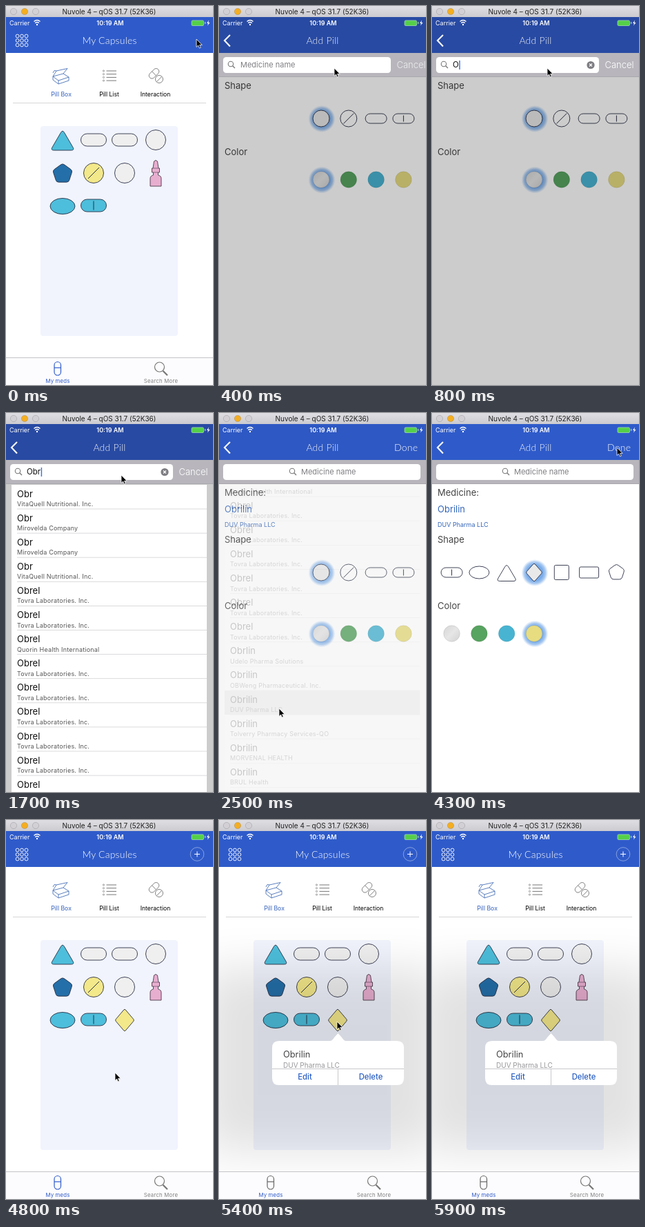
An HTML page that plays this animation: 300x549 px, repeating every 6000 ms.

```html
<!DOCTYPE html>
<html lang="en">
<head>
<meta charset="utf-8">
<title>Pill box</title>
<style>
html, body { margin: 0; width: 100%; height: 100%; overflow: hidden; background: #fff; }
svg { display: block; width: 300px; height: 549px; }
text { font-family: Inter, Roboto, sans-serif; white-space: pre; }
.nav { font-family: Lato, "Open Sans", sans-serif; font-weight: 300; letter-spacing: .2px; }
</style>
</head>
<body>
<svg id="stage" viewBox="0 0 300 549"></svg>
<script>
const LOOP = 6000, STEP = 100;
const BLUE = '#2f5bca', DIMBLUE = [40, 74, 163], LINE = '#2b2f45', TEAL = '#4dbedb', YELLOW = '#f3e88a', PALE = '#efefef';
const DRUG = 'Obrilin', MAKER = 'DUV Pharma LLC', QUERY = 'Obr';
const PITCH = 39.8, ROW = 35.1;

// ---- markup helpers ----
const text = (x, y, s, size, fill = '#222', more = '') =>
  `<text x="${x}" y="${y}" font-size="${size}" fill="${fill}" ${more}>${s}</text>`;
const mid = 'text-anchor="middle"';
const rect = (x, y, w, h, fill, more = '') =>
  `<rect x="${x}" y="${y}" width="${w}" height="${h}" fill="${fill}" ${more}/>`;
const circle = (x, y, r, fill, more = '') =>
  `<circle cx="${x}" cy="${y}" r="${r}" fill="${fill}" ${more}/>`;
const path = (d, stroke, width = 1, fill = 'none', more = '') =>
  `<path d="${d}" stroke="${stroke}" stroke-width="${width}" fill="${fill}" ${more}/>`;
const group = (id, body, more = '') => `<g id="${id}" ${more}>${body}</g>`;
const at = (x, y, body) => `<g transform="translate(${x} ${y})">${body}</g>`;
const edge = `stroke="${LINE}" stroke-width=".9"`;

// Closed polygon with softened corners
function soft(pts, r) {
  const n = pts.length;
  const toward = (a, b) => {
    const k = r / Math.hypot(b[0] - a[0], b[1] - a[1]);
    return `${(a[0] + (b[0] - a[0]) * k).toFixed(2)} ${(a[1] + (b[1] - a[1]) * k).toFixed(2)}`;
  };
  return pts.map((p, i) =>
    `${i ? 'L' : 'M'}${toward(p, pts[(i + n - 1) % n])}Q${p[0]} ${p[1]} ${toward(p, pts[(i + 1) % n])}`).join('') + 'Z';
}
const poly = (pts, r, fill) => path(soft(pts, r), LINE, .9, fill);
const pill = (w, h, fill) => rect(-w / 2, -h / 2, w, h, fill, `rx="${h / 2}" ${edge}`);
const round = (r, fill) => circle(0, 0, r, fill, edge);
const oval = (rx, ry, fill) => `<ellipse rx="${rx}" ry="${ry}" fill="${fill}" ${edge}/>`;
const triangle = (w, h, fill) => poly([[0, -h], [w, h], [-w, h]], 5, fill);
const diamond = (w, h, fill) => poly([[0, -h], [w, 0], [0, h], [-w, 0]], 2, fill);
const pentagon = (r, fill) => poly([0, 1, 2, 3, 4].map(i => {
  const a = (i * 72 - 90) * Math.PI / 180;
  return [r * Math.cos(a), r * Math.sin(a)];
}), 3, fill);
const slash = r => path(`M${-r} ${r}L${r} ${-r}`, LINE);
const bar = h => path(`M0 ${-h}V${h}`, LINE);

// ---- home page ----
const bottle = path('M-2.5 -18Q0 -21 2.5 -18L4 -8H5.5V-2H3.5V2Q8 3 8 7V18H-8V7Q-8 3 -3.5 2V-2H-5.5V-8H-4Z', '#4a3b4a', .9, '#e8aed0')
  + path('M-4 -8H4M-3.5 -2H3.5', '#4a3b4a', .6);
const shelf = [
  [82, 194, triangle(17.5, 15, TEAL)], [127, 194, pill(37, 18, PALE)],
  [172, 194, pill(37, 18, PALE)], [217, 194, round(14.5, PALE)],
  [82, 243, pentagon(15, '#246fa9')], [127, 242, round(14.5, YELLOW) + slash(8)],
  [172, 242, round(14.5, PALE)], [217, 243, bottle],
  [82, 290, oval(18, 11.5, TEAL)], [127, 289, pill(37, 18, TEAL) + bar(6.5)]
].map(p => at(...p)).join('');

const boxIcon = path('M68 102L83 98L91 103L76 108ZM68 102V107L76 113L91 108V103M76 108V113M68 102L73 94L89 90.500L83 98M73 94L70 93.500L68 97', '#4a72b8', .9, 'none', 'stroke-linejoin="round"');
const listIcon = [94, 98.7, 103.4, 108.1].map(y => circle(141.5, y, 1.1, 'none', 'stroke="#777" stroke-width=".7"')
  + path(`M145.500 ${y}H160`, '#777', 1)).join('');
const mixIcon = `<g transform="rotate(-45 214 98)">${rect(206, 94, 17, 8.5, 'none', 'rx="4.2" stroke="#777" stroke-width=".9"')}${path('M214.500 94V102.500', '#777', .9)}</g>`
  + circle(222, 106, 5.5, '#fff', 'stroke="#777" stroke-width=".9"') + path('M218.500 109.500L225.500 102.500', '#777', .9);

const home = rect(0, 68, 300, 481, '#fff') + boxIcon + listIcon + mixIcon
  + text(80, 131, 'Pill Box', 8.7, '#3562bd', mid) + text(149.5, 131, 'Pill List', 8.7, '#000', mid)
  + text(216.5, 131, 'Interaction', 8.7, '#000', mid)
  + rect(10, 140, 280, 1, '#d6d6d9') + rect(50, 174, 199, 304, '#f1f4fd', 'rx="4"')
  + shelf + group('added', diamond(14, 16.5, YELLOW), 'transform="translate(172 290)"')
  + group('shade', rect(-25, 215, 350, 265, '#000', 'opacity=".115" filter="url(#blur)"'), 'clip-path="url(#body)"')
  + rect(0, 509, 300, 40, '#fcfcfe') + rect(0, 509, 300, 1, '#c4c4c8')
  + group('medIcon', rect(70, 515.5, 9.5, 19.5, 'none', 'rx="4.7"') + '<path d="M70 524H79.500"/>', 'stroke-width="1.2"')
  + text(75, 546, 'My meds', 7.8, BLUE, mid + ' letter-spacing=".15"')
  + circle(222.5, 523, 7, 'none', 'stroke="#777" stroke-width="1.2"') + path('M227.500 528.500L234 535', '#777', 2.2)
  + text(224.5, 546, 'Search More', 7.8, '#808080', mid + ' letter-spacing=".2"');

// ---- add page ----
const choices = [
  round(12, 'inherit'), round(12, 'inherit') + slash(7.5), pill(31, 14, 'inherit'), pill(31, 14, 'inherit') + bar(4.5),
  oval(14.5, 9, 'inherit'), triangle(14.8, 12.5, 'inherit'), diamond(12, 13.5, 'inherit'),
  rect(-10.5, -10.5, 21, 21, 'inherit', `rx="2" ${edge}`), rect(-14, -8, 28, 16, 'inherit', `rx="2" ${edge}`), pentagon(12.3, 'inherit')
].map((s, i) => `<g class="choice" transform="translate(${i * PITCH} 0)">${s}</g>`).join('');
const colors = ['url(#pearl)', '#57a360', '#48b4d2', '#e7dc80']
  .map((c, i) => circle(i * PITCH, 0, 11.8, c, 'stroke="#0002" stroke-width=".7"')).join('');
const halo = y => circle(149, y, 19.5, 'url(#halo)');

const add = rect(0, 68, 300, 481, '#fff')
  + group('info', text(8, 120, 'Medicine:', 13, '#444') + text(8, 144, DRUG, 13, '#3566b8') + text(8, 165, MAKER, 9, '#3566b8'))
  + group('form', text(8, 120, 'Shape', 13, '#444') + text(8, 216, 'Color', 13, '#444')
    + halo(163.5) + halo(252) + `<g clip-path="url(#strip)">${group('shapes', choices)}${group('colors', colors)}</g>`)
  + group('dim', rect(0, 103, 300, 446, '#000', 'opacity=".2"'));

const searchBar = rect(0, 68, 300, 35, '#b8b6bc') + rect(0, 102, 300, 1, '#a9a8ae')
  + rect(6, 74, 286, 23, '#fff', 'id="field" rx="4.5"')
  + group('lens', circle(-1, -1, 3.7, 'none', 'stroke="#777" stroke-width="1.1"') + path('M1.800 1.800L5 5', '#777', 1.3))
  + text(0, 89, 'Medicine name', 11, '#7f7f84', 'id="hint"')
  + text(30, 89, '', 11.5, '#111', 'id="typed"') + rect(49, 79, 1.5, 13, '#3f73e6', 'id="caret"')
  + group('clear', circle(230, 85.5, 5.6, '#7d7d82') + path('M228 83.500L232 87.500M232 83.500L228 87.500', '#fff', 1.2))
  + text(0, 89.5, 'Cancel', 13, '#fff', 'id="cancel" font-weight="300"');

// ---- result list ----
const lab = 'Tovra Laboratories. Inc.', nutri = 'VitaQuell Nutritional. Inc.', firm = 'Mirovelda Company';
const results = [
  [QUERY, nutri], [QUERY, firm], [QUERY, firm], [QUERY, nutri], ['Obrel', lab], ['Obrel', lab],
  ['Obrel', 'Quorin Health International'], ...Array(6).fill(['Obrel', lab]),
  ['Obrlin', 'Udelo Pharma Solutions'], [DRUG, 'OBWeng Pharmaceutical. Inc.'], [DRUG, MAKER],
  [DRUG, 'Tolverry Pharmacy Services-QO'], [DRUG, 'MORVENAL HEALTH'], [DRUG, 'BRUL Health'], [DRUG, lab]
];
const rows = results.map(([name, maker], i) => at(0, 104 + i * ROW,
  (i === 15 ? rect(8, 0, 283, ROW, '#d4d4d4', 'id="hit"') : '')
  + text(16, 17.5, name, 13, '#111') + text(16, 31, maker, 9, '#555', 'letter-spacing=".2"')
  + rect(16, 34.6, 275, .8, '#d2d2d5'))).join('');
const list = rect(8, 104, 283, 445, '#fff') + `<g clip-path="url(#listBox)">${group('rows', rows)}</g>`;

// ---- header and window frame ----
const dots = [43.5, 50, 56.5].map(y => [16.5, 23, 29.5]
  .map(x => circle(x, y, 2.4, 'none', 'stroke="#fff" stroke-width=".9"')).join('')).join('');
const homeNav = dots + text(150, 55, 'My Capsules', 14, '#fff', mid + ' class="nav"')
  + group('plus', circle(277, 49.5, 9.8, 'none', 'stroke="#fff" stroke-width=".7" stroke-opacity=".6"') + path('M273 49.500H281M277 45.500V53.500', '#fff', 1));
const addNav = path('M16 42L8 50L16 58.500', '#fff', 2.1) + text(150, 55, 'Add Pill', 14, '#fff', mid + ' class="nav" opacity=".9"')
  + text(254, 55, 'Done', 14, '#fff', 'id="done" class="nav"');
const frame = rect(0, 0, 300, 16, 'url(#chrome)')
  + [['#d2d0d4', 11], ['#f4ae22', 27], ['#d2d0d4', 43]].map(([c, x]) => circle(x, 8, 4.6, c, 'stroke="#0003" stroke-width=".7"')).join('')
  + text(149.5, 12, 'Nuvole 4 – qOS 31.7 (52K36)', 10, '#222', mid)
  + text(5, 28, 'Carrier', 9, '#fff')
  + path('M40.500 22.500Q45 18.500 49.500 22.500M42.200 24.700Q45 22.200 47.800 24.700', '#fff', 1.3) + circle(45, 27, 1.2, '#fff')
  + text(151, 28, '10:19 AM', 9, '#fff', mid + ' font-weight="600"')
  + rect(269, 21, 17.5, 7.5, '#55d049', 'rx="1.5" stroke="#9fd8b0" stroke-width=".8"') + rect(288, 23, 1.2, 3, '#9fd8b0')
  + path('M294 20.500L291 25H293L292 28.500L295.500 24H293.300Z', 'none', 0, '#fff');

// ---- popover ----
const popup = path('M87 320H161Q164 320 167 315L172.500 309L178 315Q181 320 184 320H258Q268 320 268 330V374Q268 384 258 384H87Q77 384 77 374V330Q77 320 87 320Z', 'none', 0, '#fff')
  + text(93, 343.5, DRUG, 12.8, '#444') + text(93, 359, MAKER, 10, '#98989c')
  + rect(77, 360, 191, 1, '#c8c8cc') + rect(172, 360, 1, 24, '#c8c8cc')
  + text(124.5, 376, 'Edit', 11.3, '#2a5fc4', mid + ' font-weight="500"') + text(220, 376, 'Delete', 11.3, '#2a5fc4', mid + ' font-weight="500"');

const arrow = path('M0 0V11.500L2.600 9L4.400 13L6.300 12.200L4.600 8.400H8.200Z', '#fff', .8, '#000');

document.getElementById('stage').innerHTML = `<defs>
  <linearGradient id="chrome" x2="0" y2="1"><stop stop-color="#dfdee2"/><stop offset="1" stop-color="#cccbd0"/></linearGradient>
  <linearGradient id="pearl" y2="1"><stop stop-color="#d6d6d6"/><stop offset=".5" stop-color="#e6e6e6"/><stop offset="1" stop-color="#d2d2d2"/></linearGradient>
  <radialGradient id="halo"><stop offset=".6" stop-color="#79ace9"/><stop offset=".8" stop-color="#8db8ec" stop-opacity=".75"/><stop offset="1" stop-color="#a8c9f0" stop-opacity="0"/></radialGradient>
  <filter id="blur" x="-50%" y="-50%" width="200%" height="200%"><feGaussianBlur stdDeviation="34"/></filter>
  <clipPath id="body">${rect(0, 68, 300, 441, '#000')}</clipPath>
  <clipPath id="strip">${rect(12, 103, 279, 300, '#000')}</clipPath>
  <clipPath id="listBox">${rect(8, 104, 283, 445, '#000')}</clipPath>
</defs>` + group('home', home) + group('add', add + group('search', searchBar) + group('list', list))
  + rect(0, 16, 300, 52, BLUE, 'id="header"') + group('homeNav', homeNav) + group('addNav', addNav)
  + frame + group('popup', popup) + group('cursor', arrow);

// ---- motion ----
const el = {};
document.querySelectorAll('[id]').forEach(n => el[n.id] = n);
const choiceNodes = document.querySelectorAll('.choice');
const mix = (a, b, p) => a + (b - a) * p;

// Value at t along [time, value] stops
function along(t, stops) {
  if (t <= stops[0][0]) return stops[0][1];
  for (let i = 1; i < stops.length; i++) {
    const [t0, a] = stops[i - 1], [t1, b] = stops[i];
    if (t < t1) return mix(a, b, (t - t0) / (t1 - t0));
  }
  return stops[stops.length - 1][1];
}
const tracks = {
  push: [[0, 0], [100, .6], [200, 1], [4400, 1], [4500, .45], [4600, 0]],
  search: [[300, 0], [400, .86], [500, 1], [2300, 1], [2400, .3], [2500, 0]],
  dim: [[300, 0], [400, 1], [2300, 1], [2500, .18], [2600, 0]],
  list: [[900, 0], [1000, 1], [2300, 1], [2400, .6], [2500, .2], [2600, 0]],
  scroll: [[1700, 0], [1800, 25], [1900, 85], [2000, 160], [2100, 210], [2200, 228.5]],
  shapes: [[2800, 0], [2900, -25], [3000, -75], [3100, -115], [3200, -165], [3300, -213], [3400, -234.8], [3500, -6 * PITCH]],
  colors: [[3600, 0], [3700, -18], [3900, -85], [4000, -112], [4100, -3 * PITCH]],
  pop: [[5200, 0], [5300, .5], [5400, 1]]
};
const cursorStops = [
  [0, 276, 48], [100, 276, 48], [300, 167, 90], [1700, 167, 90], [1900, 150, 190], [2300, 87, 428], [2500, 87, 428],
  [2800, 215, 235], [3000, 150, 230], [3200, 190, 228], [3400, 128, 226], [3600, 215, 318], [3900, 135, 325],
  [4100, 140, 335], [4300, 268, 50], [4500, 268, 50], [4800, 158, 366], [4900, 158, 366], [5100, 171, 292],
  [5400, 171, 292], [5700, 310, 270]
];
const cursorX = cursorStops.map(s => [s[0], s[1]]), cursorY = cursorStops.map(s => [s[0], s[2]]);

const move = (node, x, y) => node.setAttribute('transform', `translate(${x} ${y})`);
const fade = (node, v) => node.setAttribute('opacity', v);
const set = (node, name, v) => node.setAttribute(name, v);

function draw(t) {
  const v = {};
  for (const k in tracks) v[k] = along(t, tracks[k]);
  const chosen = t >= 2400;

  move(el.home, -90 * v.push, 0);
  move(el.add, 300 * (1 - v.push), 0);
  fade(el.homeNav, 1 - v.push);
  fade(el.addNav, v.push);
  fade(el.plus, t < 100 ? 0 : 1);
  fade(el.done, chosen ? 1 : 0);
  fade(el.added, t >= 4500 ? 1 : 0);

  set(el.header, 'fill', `rgb(${[47, 91, 202].map((c, i) => Math.round(mix(c, DIMBLUE[i], v.dim)))})`);
  fade(el.dim, v.dim);

  const slide = Math.min(1, v.search * 1.17);
  const typed = t < 2400 ? QUERY.slice(0, t < 800 ? 0 : t < 1000 ? 1 : t < 1200 ? 2 : 3) : '';
  set(el.field, 'width', mix(286, 236, v.search));
  move(el.lens, mix(107, 18, slide), 85);
  set(el.hint, 'x', mix(119, 31, slide));
  fade(el.hint, typed ? 0 : 1);
  el.typed.textContent = typed;
  set(el.caret, 'x', typed ? 30.5 + el.typed.getComputedTextLength() : 30);
  fade(el.caret, v.search === 1 && t % 1000 >= 500 ? 1 : 0);
  fade(el.clear, typed ? 1 : 0);
  set(el.cancel, 'x', mix(300, 250.5, v.search));
  fade(el.cancel, v.search ** 2);

  fade(el.list, v.list);
  move(el.rows, 0, -v.scroll);
  fade(el.hit, t >= 2300 ? 1 : 0);

  fade(el.info, chosen ? 1 : 0);
  move(el.form, 0, chosen ? 68 : 0);
  move(el.shapes, 148 + v.shapes, 163);
  move(el.colors, 148 + v.colors, 251.5);
  const pick = Math.round(-v.shapes / PITCH);
  choiceNodes.forEach((n, i) => set(n, 'fill', i === pick ? '#e9e9e9' : 'none'));

  fade(el.shade, v.pop);
  fade(el.popup, v.pop);
  set(el.medIcon, 'stroke', v.pop ? '#666' : BLUE);
  move(el.cursor, along(t, cursorX), along(t, cursorY));
}

const start = performance.now();
function tick() {
  const t = (performance.now() - start) % LOOP;
  draw(Math.floor(t / STEP) * STEP);
  requestAnimationFrame(tick);
}
tick();
</script>
</body>
</html>
```
